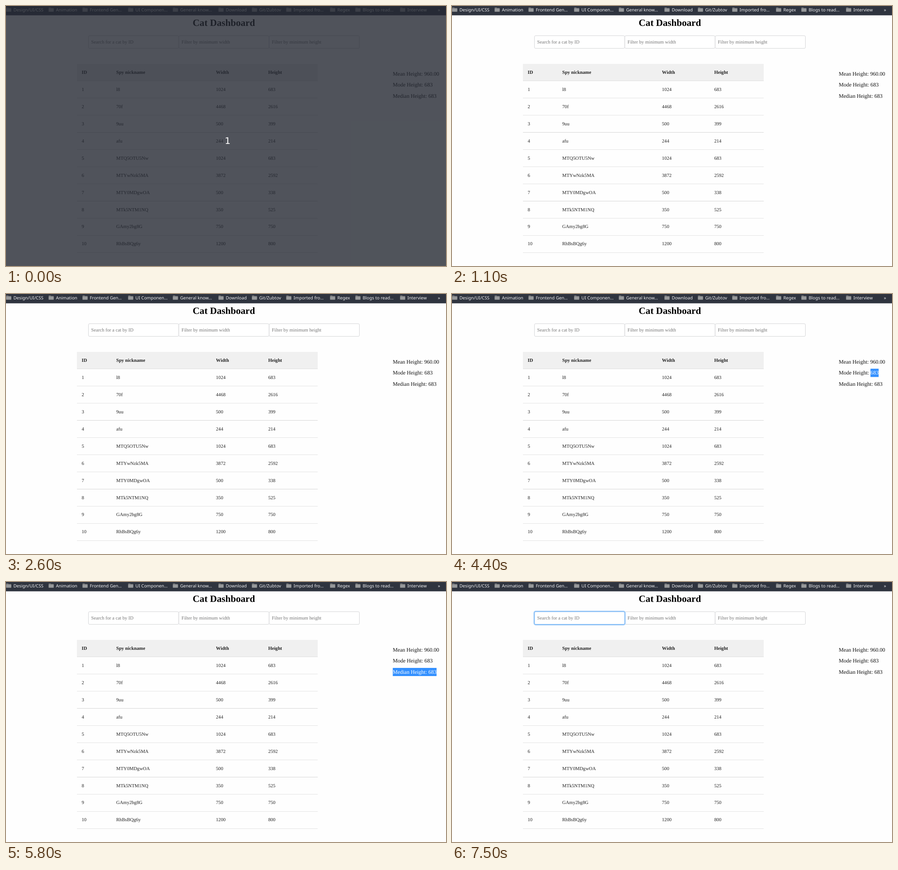
Recreate the animation shown at these times as an HTML page. Size 974 by 575 pixels, loop 8000 ms.

```html
<!DOCTYPE html>
<html lang="en">
<head>
<meta charset="utf-8">
<title>Cat Dashboard</title>
<style>
  html, body { margin: 0; width: 974px; height: 575px; overflow: hidden; background: #fefefe; }
  svg { display: block; }
  text { font-family: "Liberation Serif", "Times New Roman", serif; text-rendering: geometricPrecision; white-space: pre; }
  .title { font-size: 21.14px; font-weight: bold; text-anchor: middle; }
  .cell { font-size: 10.65px; fill: #222; }
  .head { font-size: 10.65px; font-weight: bold; fill: #222; }
  .hint { font-size: 10.65px; fill: #757575; }
  .stat { font-size: 12.04px; fill: #111; }
  .picked { font-size: 12.04px; fill: #fff; }
  .mark { font-family: "Noto Sans", "Open Sans", sans-serif; font-size: 9.75px; fill: #f1f1f2; }
  .count { font-family: "DejaVu Sans", sans-serif; font-size: 20px; fill: #fff; }
</style>
</head>
<body>
<svg id="stage" width="974" height="575" viewBox="0 0 974 575">
  <defs><clipPath id="clip"><rect id="clipBox"/></clipPath></defs>
</svg>
<script>
const LOOP = 8000;
const stage = document.getElementById('stage');
const clipBox = document.getElementById('clipBox');

function add(tag, attrs, parent = stage) {
  const el = document.createElementNS('http://www.w3.org/2000/svg', tag);
  for (const key in attrs) el.setAttribute(key, attrs[key]);
  return parent.appendChild(el);
}
const box = (x, y, width, height, fill, more) =>
  add('rect', { x, y, width, height, fill, ...more });
function label(str, x, y, cls, parent) {
  const el = add('text', { x, y, class: cls }, parent);
  el.textContent = str;
  return el;
}
const show = (el, on) => el.setAttribute('visibility', on ? 'visible' : 'hidden');

// Bookmark bar
box(0, 0, 974, 20.6, '#2f343f');
const marks = [
  ['Design/UI/CSS', 17], ['Animation', 111], ['Frontend Gen…', 186],
  ['UI Componen…', 287], ['General know…', 386], ['Download', 487],
  ['Git/Zubtov', 561], ['Imported fro…', 637], ['Regex', 734],
  ['Blogs to read…', 790], ['Interview', 889]
];
for (const [name, x] of marks) {
  const left = x - 16.5;
  add('path', { d: `M${left} 3.2h4.5l1 1.4h5.5v7.9h-11z`, fill: '#77797c' });
  box(left, 5.8, 11, 6.7, '#97999b', { rx: .5 });
  label(name, x - .5, 11.6, 'mark');
}
label('»', 956, 11.6, 'mark');

// Title and filters
label('Cat Dashboard', 482.3, 43.8, 'title');
const fields = ['Search for a cat by ID', 'Filter by minimum width', 'Filter by minimum height'];
fields.forEach((hint, i) => {
  const x = 182.6 + i * 200;
  box(x, 65.7, 199.7, 28, '#fff', { rx: 2.5, stroke: '#cfd0d2', 'stroke-width': .9 });
});
const focus = add('g', {});
add('rect', { x: 181.7, y: 64.8, width: 201.4, height: 29.8, rx: 3.5, fill: 'none',
  stroke: '#a9d0fa', 'stroke-width': 2.6 }, focus);
add('rect', { x: 182.6, y: 65.7, width: 199.7, height: 28, rx: 2.5, fill: '#fff',
  stroke: '#5aa6f0', 'stroke-width': 1 }, focus);
fields.forEach((hint, i) => label(hint, 188.6 + i * 199.9, 82.8, 'hint'));
const caret = box(188.4, 73, .9, 12, '#222');

// Table
const cols = [167.5, 244, 464.8, 580.4];
const pitch = 37.96;
const rows = [
  ['l8', 1024, 683], ['70f', 4468, 2616], ['9uu', 500, 399], ['afu', 244, 214],
  ['MTQ5OTU5Nw', 1024, 683], ['MTYwNzk5MA', 3872, 2592], ['MTY0MDgwOA', 500, 338],
  ['MTk5NTM1NQ', 350, 525], ['GAmy2bg8G', 750, 750], ['RhBsBQg6y', 1200, 800]
];
box(157, 128, 533, 37.3, '#f0f0f0');
box(157, 165, 533, .9, '#dedede');
['ID', 'Spy nickname', 'Width', 'Height'].forEach((s, c) => label(s, cols[c], 149.8, 'head'));
rows.forEach((row, i) => {
  [i + 1, ...row].forEach((s, c) => label(s, cols[c], 187.8 + i * pitch, 'cell'));
  const dark = i % 4 === 2;
  box(157, Math.round(203 + i * pitch), 533, 1, dark ? '#d6d6d6' : '#e3e3e3');
});

// Statistics, with a clipped white copy for selected text
const stats = ['Mean Height: 960.00', 'Mode Height: 683', 'Median Height: 683'];
const statY = i => 153.7 + i * 24.55;
const lines = stats.map((s, i) => label(s, 856.2, statY(i), 'stat'));
const picked = add('g', { 'clip-path': 'url(#clip)' });
add('rect', { x: 850, y: 135, width: 124, height: 80, fill: '#3390ff' }, picked);
stats.forEach((s, i) => label(s, 856.2, statY(i), 'picked', picked));

// Countdown cover
const cover = add('g', {});
add('rect', { width: 974, height: 575, fill: '#252932', 'fill-opacity': .8 }, cover);
label('1', 484.2, 304.7, 'count', cover);

// Start time, line, first and end character of the selection
const picks = [
  [0], [1000, 0, 0, 1], [1100],
  [2200, 0, 1, 4], [2300, 0, 1, 8], [2400, 0, 1, 14], [2500, 0, 1, 19], [2600],
  [4400, 1, 13, 16], [4600, 1, 0, 16], [5300],
  [5600, 2, 13, 14], [5800, 2, 0, 18], [6900]
];

function draw() {
  const t = performance.now() % LOOP;
  const [, line, from, to] = picks.filter(p => p[0] <= t).pop();
  const on = line !== undefined;
  show(picked, on);
  if (on) {
    const x = lines[line].getStartPositionOfChar(from).x;
    const end = lines[line].getEndPositionOfChar(to - 1).x;
    clipBox.setAttribute('x', x);
    clipBox.setAttribute('y', statY(line) - 12.9);
    clipBox.setAttribute('width', end - x);
    clipBox.setAttribute('height', 18.2);
  }
  show(cover, t < 100);
  show(focus, t >= 6900);
  focus.setAttribute('opacity', t < 7000 ? .5 : 1);
  show(caret, t >= 7000 && t < 7500);
  requestAnimationFrame(draw);
}
draw();
</script>
</body>
</html>
```
